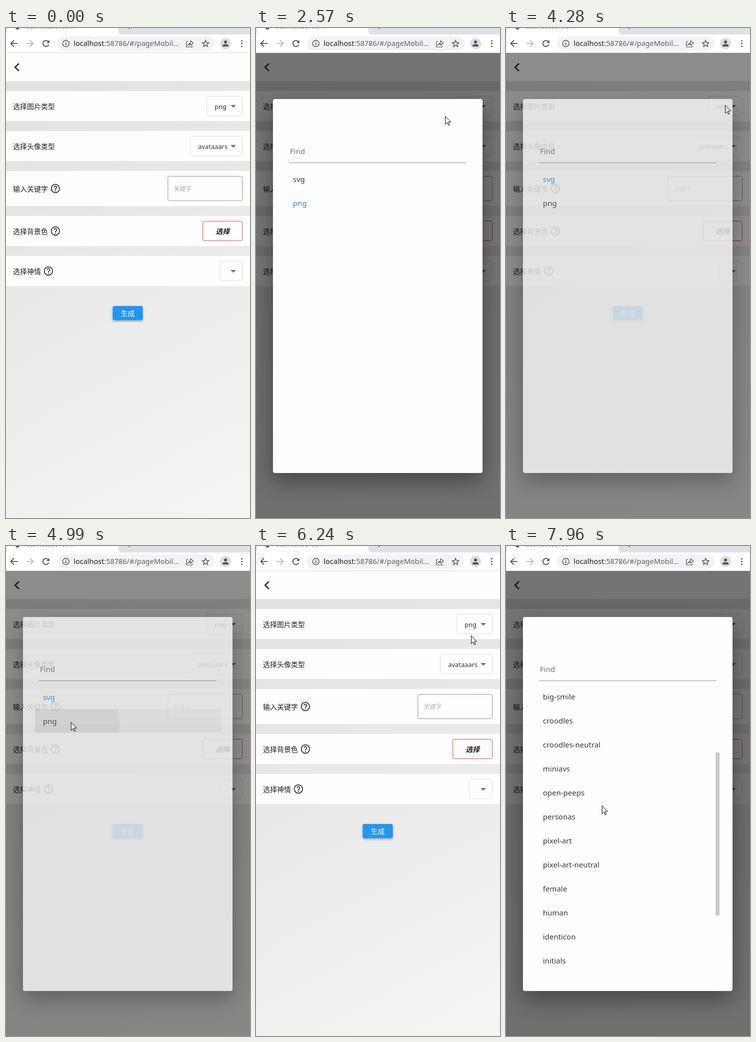
Recreate the animation shown at these times as an HTML page with a canvas. Size 489x980 px, loop 8000 ms.

```html
<!DOCTYPE html>
<html lang="zh-CN">
<head>
<meta charset="utf-8">
<title>Avatar form</title>
<style>
html, body { margin: 0; width: 489px; height: 980px; overflow: hidden; background: #fff; }
canvas { display: block; }
</style>
</head>
<body>
<canvas id="stage" width="489" height="980"></canvas>
<script>
const W = 489, H = 980, LOOP = 8000;
const REFRESH = 78, PHASE = 66, FADE_MS = 160;
const stage = document.getElementById('stage').getContext('2d');
const layer = document.createElement('canvas');
layer.width = W;
layer.height = H;
const panel = layer.getContext('2d');

const LATIN = '"Noto Sans", "Open Sans", sans-serif';
const HAN = '"Noto Sans CJK SC", "Noto Sans CJK", sans-serif';
const INK = '#505357';
const LIST = { top: 278, height: 588, row: 48, count: 22 };
const TYPES = ['svg', 'png'];
const STYLES = ['male', 'adventurer', 'adventurer-neutral', 'big-ears', 'big-ears-neutral',
  'big-smile', 'croodles', 'croodles-neutral', 'miniavs', 'open-peeps', 'personas', 'pixel-art',
  'pixel-art-neutral', 'female', 'human', 'identicon', 'initials'];
const ROWS = [
  { label: '选择图片类型', y: 126, h: 60 },
  { label: '选择头像类型', y: 206, h: 60 },
  { label: '输入关键字', y: 286, h: 70, help: true },
  { label: '选择背景色', y: 376, h: 60, help: true },
  { label: '选择神情', y: 456, h: 60, help: true },
];
const DIALOGS = [
  { open: 2090, close: 3187, fadeIn: FADE_MS, items: TYPES, selected: 'png' },
  { open: 4195, close: 4903, fadeIn: FADE_MS, items: TYPES, selected: 'svg' },
  { open: 6850, close: Infinity, fadeIn: 1, items: STYLES },
];
const MOVES = [
  { from: 160, to: 390, x: 276, y: 446 },
  { from: 1100, to: 1930, x: 422, y: 155 },
  { from: 2500, to: 2960, x: 103, y: 310 },
  { from: 3430, to: 4050, x: 439, y: 154 },
  { from: 4360, to: 4820, x: 130, y: 352 },
  { from: 4990, to: 5130, x: 261, y: 306 },
  { from: 5140, to: 5770, x: 434, y: 155 },
  { from: 6160, to: 6390, x: 425, y: 235 },
  { from: 6980, to: 7420, x: 192, y: 519 },
];

const progress = (t, from, to) => Math.min(1, Math.max(0, (t - from) / (to - from)));
const easeOut = p => 1 - (1 - p) ** 2;

function pointerAt(t) {
  let x = 464, y = 960;
  for (const move of MOVES) {
    const p = progress(t, move.from, move.to);
    x += (move.x - x) * p;
    y += (move.y - y) * p;
  }
  return [Math.round(x), Math.round(y)];
}

function text(c, str, x, y, font, color) {
  c.font = font;
  c.fillStyle = color;
  c.fillText(str, x, y);
}
const latin = (c, str, x, y, size, color, weight = 400) =>
  text(c, str, x, y, `${weight} ${size}px ${LATIN}`, color);
const han = (str, x, y, size = 14, color = '#212121', style = '') =>
  text(stage, str, x, y, `${style} ${size}px ${HAN}`, color);

function rect(c, x, y, w, h, color) {
  c.fillStyle = color;
  c.fillRect(x, y, w, h);
}
function round(c, x, y, w, h, r, color) {
  c.beginPath();
  c.roundRect(x, y, w, h, r);
  c.fillStyle = color;
  c.fill();
}
function frame(x, y, w, h, color) {
  stage.beginPath();
  stage.roundRect(x + .5, y + .5, w - 1, h - 1, 3);
  stage.strokeStyle = color;
  stage.lineWidth = 1;
  stage.stroke();
}
function path(points, closed) {
  stage.beginPath();
  points.forEach(([x, y]) => stage.lineTo(x, y));
  if (closed) stage.closePath();
}
function line(points, color, width, closed) {
  path(points, closed);
  stage.strokeStyle = color;
  stage.lineWidth = width;
  stage.stroke();
}
function shape(points, color) {
  path(points, true);
  stage.fillStyle = color;
  stage.fill();
}
function arc(x, y, r, color, width, from = 0, to = 2 * Math.PI) {
  stage.beginPath();
  stage.arc(x, y, r, from, to);
  stage.strokeStyle = color;
  stage.lineWidth = width;
  stage.stroke();
}
function dot(c, x, y, r, color) {
  c.beginPath();
  c.arc(x, y, r, 0, 2 * Math.PI);
  c.fillStyle = color;
  c.fill();
}
function shadow(c, color, blur, y) {
  c.shadowColor = color;
  c.shadowBlur = blur;
  c.shadowOffsetY = y;
}

function drawArrow(x, dir, color) {
  line([[x - 7 * dir, 31], [x + 7 * dir, 31]], color, 1.8);
  line([[x, 24.5], [x - 6.5 * dir, 31], [x, 37.5]], color, 1.8);
}

function drawBrowser() {
  rect(stage, 0, 0, W, 50, '#fff');
  rect(stage, 0, 0, 2, 10, '#dee1e6');
  round(stage, 225, -10, 280, 23, 8, '#dee1e6');
  dot(stage, 23, -1, 4, '#1565c0');
  latin(stage, 'localhost:58786/#/', 37, 1, 12, '#41689a');
  rect(stage, 246, 0, 2, 2, '#5f6368');

  drawArrow(16, 1, INK);
  drawArrow(48, -1, '#babcbe');
  arc(80, 31, 6, INK, 1.9, .35, 5.5);
  shape([[87, 24], [87, 30], [81, 30]], INK);

  round(stage, 102, 17, 316, 28, 14, '#f1f3f4');
  arc(120, 31, 6.5, INK, 1.4);
  rect(stage, 119.2, 30, 1.6, 4.5, INK);
  rect(stage, 119.2, 27, 1.6, 1.7, INK);
  latin(stage, 'localhost', 135.5, 36, 14.5, '#202124');
  const hostWidth = stage.measureText('localhost').width;
  latin(stage, ':58786/#/pageMobil...', 135.5 + hostWidth, 36, 14.5, '#5f6368');

  line([[365, 27], [361.5, 27], [361.5, 38], [373, 38], [373, 35]], INK, 1.2);
  line([[364.5, 34], [370, 28.8], [370, 25.5], [375.5, 30], [370, 34.5], [370, 31.5]], INK, 1.2, true);
  const star = Array.from({ length: 10 }, (_, i) => {
    const r = i % 2 ? 3 : 7, a = i * Math.PI / 5 - Math.PI / 2;
    return [400 + r * Math.cos(a), 31.5 + r * Math.sin(a)];
  });
  line(star, INK, 1.4, true);
  dot(stage, 440, 31, 11, '#dadce0');
  dot(stage, 440, 28, 3, INK);
  round(stage, 434, 32.5, 12, 4.5, [4, 4, 0, 0], INK);
  for (let i = -1; i <= 1; i++) dot(stage, 472.5, 31 + 5.5 * i, 1.5, INK);
  rect(stage, 0, 49, W, 1, '#dcdcdc');
}

function drawHelp(x, y) {
  const color = '#2b2b2b';
  arc(x, y, 8.3, color, 1.7);
  arc(x, y - 2.2, 2.6, color, 1.6, Math.PI, 2.35 * Math.PI);
  line([[x + 1.6, y - .4], [x, y + 1.3], [x, y + 3]], color, 1.6);
  rect(stage, x - .9, y + 4, 1.8, 1.8, color);
}

function drawSelect(x, y, h, value) {
  const mid = y + h / 2;
  frame(x, y, 474 - x, h, '#e0e0e0');
  latin(stage, value, x + 16, mid + 6, 12.9, '#333');
  shape([[450, mid - 2], [461, mid - 2], [455.5, mid + 3.5]], '#757575');
}

function drawPage(type) {
  const sky = stage.createLinearGradient(0, 50, W, H);
  sky.addColorStop(0, '#e0e0e0');
  sky.addColorStop(1, '#f5f5f5');
  rect(stage, 0, 50, W, H - 50, sky);
  rect(stage, 0, 50, W, 56, '#fefefe');
  line([[26, 71], [18.3, 78.5], [26, 86]], '#3c3c3c', 3);

  for (const { label, y, h, help } of ROWS) {
    rect(stage, 0, y, W, h, '#fefefe');
    han(label, 14, y + h / 2 + 6);
    if (help) drawHelp(29 + 14 * label.length, y + h / 2);
  }
  drawSelect(type === 'svg' ? 406 : 402, 136, 40, type);
  drawSelect(369, 216, 40, 'avataaars');
  drawSelect(427, 466, 40, '');
  frame(324, 296, 150, 50, '#99969a');
  han('关键字', 336, 326, 12, '#b9abab');
  frame(394, 386, 80, 40, '#ea4a3a');
  han('选择', 420, 412, 14, '#1c1c1c', 'italic bold');

  stage.save();
  shadow(stage, 'rgba(0,0,0,.4)', 4, 2);
  round(stage, 214, 556, 60, 28, 3, '#2196f3');
  stage.restore();
  han('生成', 230, 576, 14, '#fff', '500');
}

function drawRipple(t, click) {
  const [x, y] = pointerAt(click);
  const row = Math.floor((y - LIST.top) / LIST.row);
  panel.save();
  panel.beginPath();
  panel.rect(58, LIST.top + row * LIST.row, 372, LIST.row - 1);
  panel.clip();
  rect(panel, 58, LIST.top, 372, LIST.height, 'rgba(0,0,0,.04)');
  dot(panel, x, y, (t - click + 70) * .45, 'rgba(0,0,0,.06)');
  panel.restore();
}

function drawDialog(t, { items, selected, close }) {
  const scroll = 241 * progress(t, 7640, 7940);
  const click = close - 70;

  panel.clearRect(0, 0, W, H);
  panel.save();
  shadow(panel, 'rgba(0,0,0,.36)', 40, 16);
  round(panel, 34, 142, 420, 748, 4, '#fefefe');
  panel.restore();
  latin(panel, 'Find', 68, 252, 15, '#757575');
  rect(panel, 66, 269, 356, 1, '#949494');
  if (t >= click) drawRipple(t, click);

  panel.save();
  panel.beginPath();
  panel.rect(58, LIST.top, 372, LIST.height);
  panel.clip();
  items.forEach((name, i) => {
    const chosen = name === selected;
    latin(panel, name, 74, Math.round(308 + i * LIST.row - scroll), 15,
      chosen ? '#2f92dc' : '#3c3c3c', chosen ? 500 : 400);
  });
  if (scroll > 0) {
    const scale = LIST.height / (LIST.count * LIST.row);
    round(panel, 420, LIST.top + scroll * scale, 8, LIST.height * scale, 4, '#cbcbcb');
  }
  panel.restore();
}

function drawPointer([x, y]) {
  const outline = [[0, 0], [0, 16], [4, 12.5], [6, 18], [8.5, 17], [6, 11.5], [11, 11.5]]
    .map(([px, py]) => [x + px + .5, y + py + .5]);
  shape(outline, '#fff');
  line(outline, '#000', 1, true);
}

function draw(now) {
  const time = now % LOOP;
  const t = Math.floor((time - PHASE) / REFRESH) * REFRESH + PHASE;
  const [first, second] = DIALOGS;
  drawBrowser();
  drawPage(t >= first.close && t < second.close ? 'svg' : 'png');

  for (const dialog of DIALOGS) {
    const { open, close, fadeIn } = dialog;
    if (t < open || t > close + FADE_MS) continue;
    const leaving = close < Infinity ? progress(t, close, close + FADE_MS) : 0;
    const fade = easeOut(progress(t, open, open + fadeIn)) * (1 - leaving ** 2);
    rect(stage, 0, 50, W, H - 50, `rgba(0,0,0,${.54 * fade ** .7})`);
    drawDialog(t, dialog);
    stage.globalAlpha = fade;
    stage.drawImage(layer, 0, 0);
    stage.globalAlpha = 1;
  }
  if (time >= 160) drawPointer(pointerAt(t));
  requestAnimationFrame(draw);
}
requestAnimationFrame(draw);
</script>
</body>
</html>
```
